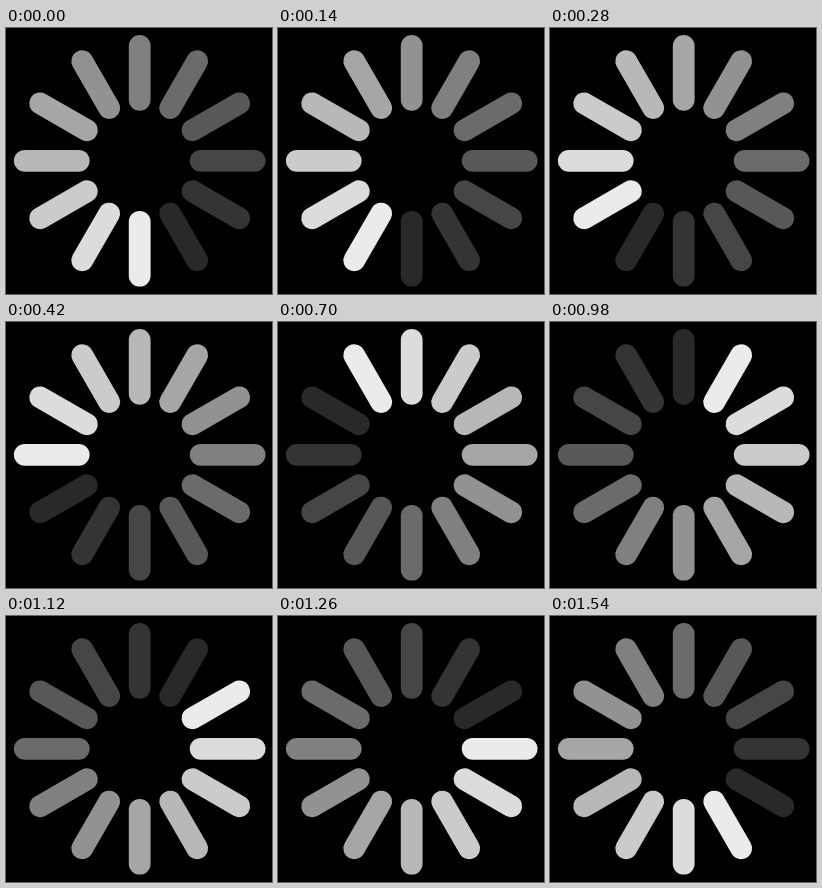
These frames come from a looping animation (266 px wide and 266 px high, 1680 ms). An HTML page:

```html
<!DOCTYPE html>
<html lang="en">
<head>
<meta charset="utf-8">
<title>Spinner</title>
<style>
  html, body { margin: 0; width: 100%; height: 100%; overflow: hidden; background: #000; }
  svg { display: block; width: 100%; height: 100%; }
  line { stroke-width: 21.8; stroke-linecap: round; }
</style>
</head>
<body>
<svg viewBox="0 0 266 266"><g id="spokes" transform="translate(133.7 132.8)"></g></svg>
<script>
  const STEP = 140;
  const START = 6; // brightest spoke at time zero, counted clockwise from the top
  const GREYS = [235, 220, 203, 184, 166, 146, 128, 107, 88, 70, 52, 41];
  const COUNT = GREYS.length;
  const group = document.getElementById('spokes');

  const spokes = GREYS.map((_, i) => {
    const line = document.createElementNS('http://www.w3.org/2000/svg', 'line');
    line.setAttribute('y1', -61);
    line.setAttribute('y2', -114.9);
    line.setAttribute('transform', `rotate(${i * 360 / COUNT})`);
    return group.appendChild(line);
  });

  const greyAt = (spoke, step) => {
    const v = GREYS[(spoke - START - step + 2 * COUNT) % COUNT];
    return `rgb(${v}, ${v}, ${v})`;
  };

  // Each grey holds for a full step, then jumps.
  spokes.forEach((line, i) => {
    const frames = Array.from({ length: COUNT + 1 }, (_, step) => ({
      stroke: greyAt(i, step % COUNT),
      offset: step / COUNT,
      easing: 'step-end'
    }));
    const animation = line.animate(frames, { duration: STEP * COUNT, iterations: Infinity });
    animation.startTime = document.timeline.currentTime;
  });
</script>
</body>
</html>
```
